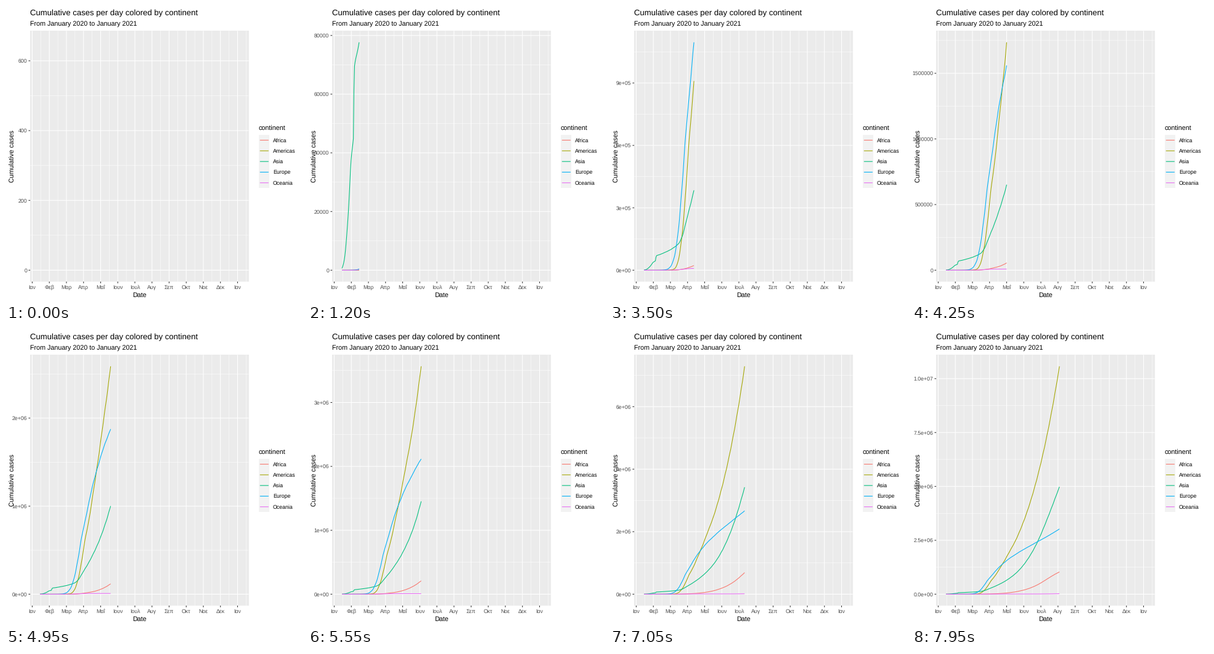
These frames come from a looping animation (480 by 480 pixels, 8 s). A matplotlib script:

```python
import math

import matplotlib.pyplot as plt
import numpy as np
from matplotlib.animation import FuncAnimation
from matplotlib.patches import Rectangle

plt.rcParams["font.family"] = "Liberation Sans"
plt.rcParams["text.hinting"] = "none"

SIZE, DPI = 480, 72
FRAMES, INTERVAL = 160, 50
LEFT, RIGHT, TOP, BOTTOM = 39.3, 393.6, 40.4, 446.9
PAD = (BOTTOM - TOP) / 22
ZERO, PEAK = BOTTOM - PAD, TOP + PAD
X0, DAY_W = 55.1, 0.925
DAYS_PER_FRAME = 349 / 279
LINE = 1.07
MONTHS = "Ιαν Φεβ Μαρ Απρ Μαΐ Ιουν Ιουλ Αυγ Σεπ Οκτ Νοε Δεκ Ιαν".split()
DAYS = np.arange(201)


def growth(*points):
    """Daily totals: smooth log-scale curve through (day, thousands), weekly ripple."""
    x, y = np.array(points, float).T
    y = np.log(y)
    m = np.gradient(y, x, edge_order=2)
    t = DAYS + 0.12 * np.sin(2 * np.pi * DAYS / 7)
    i = np.clip(np.searchsorted(x, t, side="right") - 1, 0, len(x) - 2)
    h, s = x[i + 1] - x[i], (y[i + 1] - y[i]) / (x[i + 1] - x[i])
    u = (t - x[i]) / h
    bend = (m[i] - s) * (1 - u) - (m[i + 1] - s) * u
    return 1000 * np.exp(y[i] + s * h * u + h * u * (1 - u) * bend)


# Cases reported late, all within two days
backlog = 21000 * np.clip((DAYS - 20) / 1.4, 0, 1)

SERIES = [
    ("Africa", "#F8766D",
     growth((0, .001), (50, .2), (62.5, 2.6), (76, 10.5), (97, 35),
            (124, 119), (153.8, 351), (176, 682), (199, 1034))),
    ("Americas", "#A3A500",
     growth((0, .001), (48, 1.6), (62.5, 80.3), (75, 455), (87.5, 907),
            (106, 1715), (123.8, 2592), (153.8, 4809), (176, 7230),
            (199, 10580))),
    ("Asia", "#00BF7D", backlog +
     growth((0, .653), (5, 5), (10, 16.2), (15, 34.1), (20, 45), (30, 56.5),
            (51, 85.5), (62.5, 114.2), (76, 236), (87.5, 362.5), (106, 623),
            (123.8, 982), (153.8, 2061), (176, 3370), (199, 4965))),
    ("Europe", "#00B0F6",
     growth((0, .001), (38, 2.4), (48, 24), (62.5, 257), (71, 570),
            (80.5, 875), (87.5, 1094), (106, 1550), (123.8, 1876),
            (153.8, 2336), (178, 2690), (199, 3027))),
    ("Oceania", "#E76BF3",
     growth((0, .001), (62.5, 2.8), (76, 6.9), (100, 8.3), (154, 9.3),
            (176, 13), (199, 24.5))),
]


def tick_step(peak):
    """Step of the best scoring labelling that starts at zero."""
    lo, hi = -0.05 * peak, 1.05 * peak
    best, choice = -math.inf, 1
    power = int(math.log10(peak))
    for z in (power - 1, power):
        for i, q in enumerate((1, 5, 2, 2.5, 4, 3)):
            step = q * 10 ** z
            for k in range(2, 13):
                end = (k - 1) * step
                simple = 1 - i / 5
                cover = 1 - 0.5 * ((hi - end) ** 2 + lo ** 2) / (0.1 * (hi - lo)) ** 2
                ratio = (max(hi, end) - lo) / (4 * step)
                dense = 2 - max(ratio, 1 / ratio)
                score = 0.25 * simple + 0.2 * cover + 0.5 * dense
                if score > best:
                    best, choice = score, step
    return choice


def tick_labels(values):
    """Fixed notation unless scientific is shorter."""
    fracs = [f"{v:.3e}".split("e")[0].split(".")[1].rstrip("0") for v in values]
    dec = max(map(len, fracs))
    sci = [f"{v:.{dec}e}" for v in values]
    fixed = [f"{v:.0f}" for v in values]
    return fixed if len(fixed[-1]) <= len(sci[-1]) else sci


fig = plt.figure(figsize=(SIZE / DPI, SIZE / DPI), dpi=DPI, facecolor="white")
ax = fig.add_axes([0, 0, 1, 1])
ax.set_xlim(0, SIZE)
ax.set_ylim(SIZE, 0)
ax.axis("off")


def box(x, y, w, h, color):
    ax.add_patch(Rectangle((x, y), w, h, facecolor=color, lw=0, zorder=0))


def stroke(xs, ys, color, width=LINE, z=2):
    line, = ax.plot(xs, ys, color=color, lw=width, zorder=z,
                    solid_capstyle="butt", solid_joinstyle="round")
    line.set_snap(False)
    return line


def write(x, y, s, size, color="black", **kw):
    return ax.text(x, y, s, fontsize=size, color=color, va="baseline",
                   zorder=5, **kw)


box(LEFT, TOP, RIGHT - LEFT, BOTTOM - TOP, "#EBEBEB")
for i, month in enumerate(MONTHS):
    x = 42.5 + 30 * DAY_W * i
    stroke([x, x], [TOP, BOTTOM], "white")
    stroke([x + 15 * DAY_W] * 2, [TOP, BOTTOM], "white", LINE / 2, z=1)
    stroke([x, x], [BOTTOM, BOTTOM + 2.75], "#333333")
    write(x, 459, month, 8.8, "#4D4D4D", ha="center")

write(39, 15, "Cumulative cases per day colored by continent", 13.15)
write(39, 32, "From January 2020 to January 2021", 10.7)
write(216.5, 472, "Date", 10.8, ha="center")
write(13.6, 243.7, "Cumulative cases", 10.7, ha="center", rotation=90,
      rotation_mode="anchor")

write(410, 202, "continent", 10.8)
box(410, 209, 17.4, 86.4, "#F2F2F2")
for i, (name, color, _) in enumerate(SERIES):
    y = 217.6 + 17.28 * i
    stroke([411.8, 425.8], [y, y], color)
    write(433, y + 3.1, name, 8.7)

POOL = 9
majors = [stroke([LEFT, RIGHT], [0, 0], "white") for _ in range(POOL)]
minors = [stroke([LEFT, RIGHT], [0, 0], "white", LINE / 2, 1) for _ in range(POOL)]
ticks = [stroke([LEFT - 2.75, LEFT], [0, 0], "#333333") for _ in range(POOL)]
labels = [write(34.3, 0, "", 8.8, "#4D4D4D", ha="right") for _ in range(POOL)]
curves = [stroke([], [], color, z=3) for _, color, _ in SERIES]


def update(n):
    day = n * DAYS_PER_FRAME
    t = np.append(np.arange(math.ceil(day)), day)
    data = [np.interp(t, DAYS, values) for _, _, values in SERIES]
    peak = max(d.max() for d in data)

    def to_y(v):
        return ZERO - (ZERO - PEAK) * v / peak

    for curve, d in zip(curves, data):
        curve.set_data(X0 + DAY_W * t, to_y(d))

    step = tick_step(peak)
    top = 1.05 * peak
    shown = [i * step for i in range(POOL) if i * step <= top]
    texts = tick_labels(shown)
    for i in range(POOL):
        on = i < len(shown)
        for item in (majors[i], ticks[i], labels[i]):
            item.set_visible(on)
        if on:
            y = to_y(shown[i])
            majors[i].set_ydata([y, y])
            ticks[i].set_ydata([y, y])
            labels[i].set_text(texts[i])
            labels[i].set_y(y + 3.2)
        half = (i + 0.5) * step
        minors[i].set_visible(half <= top)
        minors[i].set_ydata([to_y(half)] * 2)
    return curves


anim = FuncAnimation(fig, update, frames=FRAMES, interval=INTERVAL,
                     init_func=lambda: update(0), repeat=True,
                     repeat_delay=0, blit=False)
plt.show()
```
